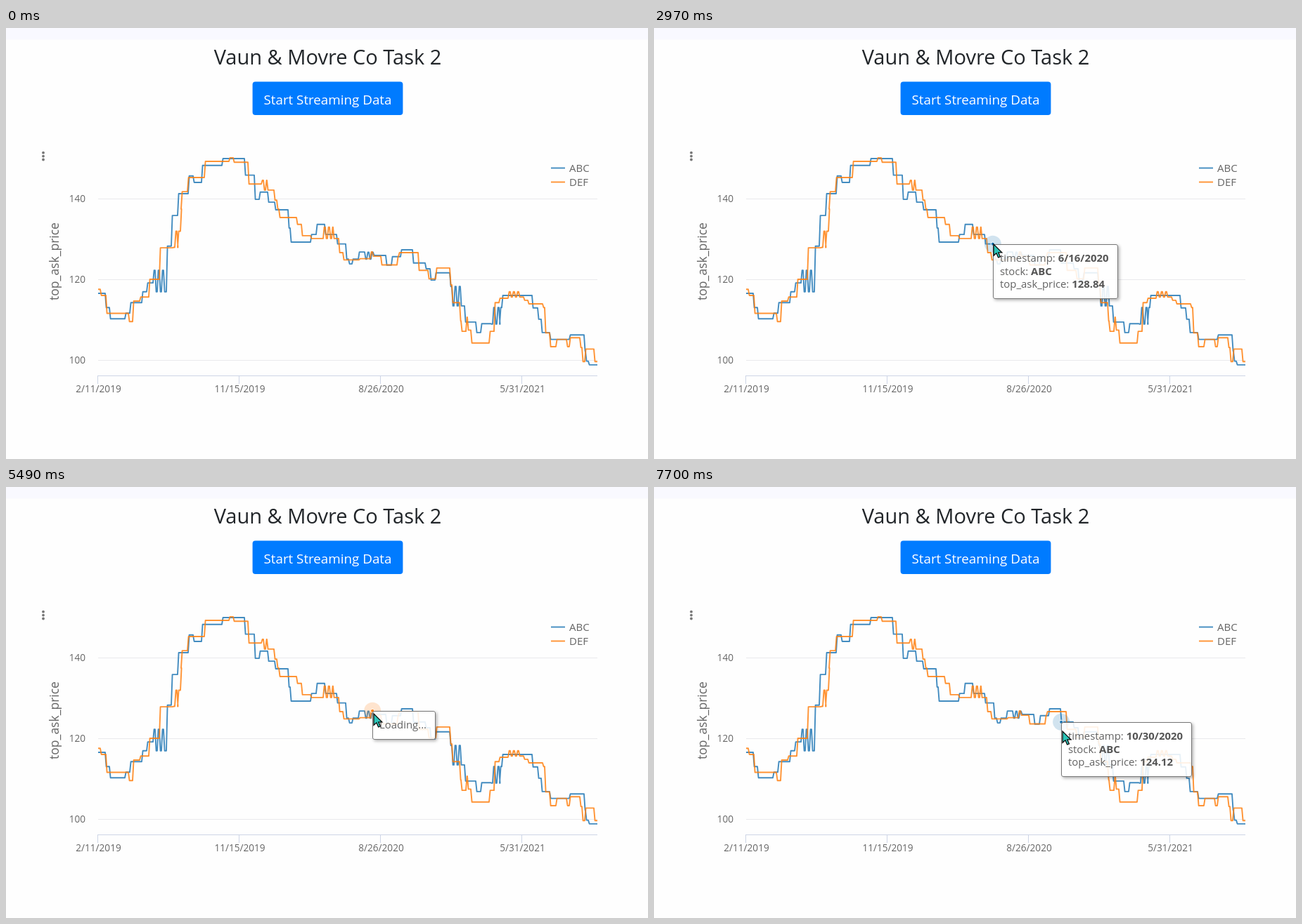
Recreate the animation shown at these times as an HTML page. Size 913 by 614 pixels, loop 8000 ms.

```html
<!DOCTYPE html>
<html lang="en">
<head>
<meta charset="utf-8">
<title>Streaming chart</title>
<style>
html, body { margin: 0; width: 100%; height: 100%; overflow: hidden; background: #fefefe; }
svg { display: block; width: 913px; height: 614px; font-family: "Open Sans", "Noto Sans", sans-serif; }
.mid { text-anchor: middle; }
.axis { font-size: 13.6px; fill: #666; }
.legend { font-size: 15px; fill: #666; }
.grid { stroke: #e9e9ec; }
.rule { stroke: #cdd5e6; fill: none; }
.line { fill: none; stroke-width: 1.9; stroke-linejoin: round; opacity: .84; }
foreignObject { overflow: visible; }
#tip {
  display: inline-block; box-sizing: border-box; padding: 9px 12px 11px 9px;
  border: 1px solid #777; border-radius: 3px; background: rgba(255,255,255,.88);
  box-shadow: 2px 2px 4px rgba(0,0,0,.3);
  font-size: 14.9px; line-height: 18.6px; white-space: nowrap; color: #626262;
}
#tip b { color: #555; }
</style>
</head>
<body>
<svg viewBox="0 0 913 614">
  <rect width="913" height="614" fill="#fefefe"/>
  <rect width="913" height="16.5" fill="#f9f9ff"/>
  <text class="mid" x="457.5" y="52" font-size="29" fill="#212529">Vaun &amp; Movre Co Task 2</text>
  <rect x="350.6" y="76.6" width="213.8" height="47.4" rx="4" fill="#007bff"/>
  <text class="mid" x="457.5" y="108.7" font-size="18.8" fill="#fff">Start Streaming Data</text>
  <g id="menu" fill="#767676"></g>
  <g id="axes"></g>
  <text class="mid" transform="translate(74.5 332.5) rotate(-90)" font-size="17.5" fill="#666">top_ask_price</text>
  <g id="plot"></g>
  <g id="hover">
    <circle id="halo" r="12" opacity=".2"/>
    <circle id="dot" r="2.6" stroke="#fff"/>
    <foreignObject id="spot" width="260" height="110"><div id="tip"></div></foreignObject>
  </g>
  <path id="cursor" d="M0 0V16.2L3.9 12.8 6.6 19 9.4 17.8 6.8 11.8H11.8Z" fill="#2cc5b8" stroke="#0a0a0a" stroke-width="1.3"/>
</svg>
<script>
const $ = id => document.getElementById(id);
const LOOP = 8000, STEP = 66;
const LEFT = 130.5, RIGHT = 841, BOTTOM = 495;
const DAY_ZERO = Date.UTC(2019, 1, 11);

const xOf = day => LEFT + day * .7155;
const yOf = price => 473.5 - (price - 100) * 5.75;
const lerp = (a, b, u) => a + (b - a) * u;
const smooth = u => u * u * (3 - 2 * u);

function add(parent, tag, attrs, text) {
  const el = document.createElementNS('http://www.w3.org/2000/svg', tag);
  for (const k in attrs) el.setAttribute(k, attrs[k]);
  if (text) el.textContent = text;
  $(parent).append(el);
}

// "x price" levels; "~" flutters between this level and the next one
const SERIES = [
  { name: 'ABC', color: '#1f77b4', levels: `131 116.6,142 113.1,148 110.3,170 111.7,177 114.3,194 117,
    201 119.2,210 122.3~,227 117,229 128.3,236 135.9,245 141.3,260 145.7,267 144.1,279 148.3,308 150,
    340 145.9,354 139.9,361 141.7,373 139.2,383 137.3,402 132.8,405 129.3,434 131.2,442 133.7,454 131.2,
    471 128.84,484 125.1,488 123.9,493 125.1,502 126.85,511 125.1~,520 126.8,523 126,541 123.6,549 125.7,
    562 127.4,579 124.12,597 122.7,604 119.9,611 121.7,632 118.3~,647 113.5,653 109.5,669 106.9,676 109.1,
    690 109~,703 113.1,706 116.1,749 113,757 110.2,762 106.9,774 105.2,802 106.3,823 102.3,825 99.8,829 98.9` },
  { name: 'DEF', color: '#ff7f0e', levels: `131 117.6,135 116.1,143 111.65,175 109.6,181 114.7,191 115.7,
    204 120.1,219 127.9,238 128~,245 132,249 137.5,250 141.8,259 145.3,283 149.3,318 150.2,324 149.1,
    345 143.7,364 144.6~,372 142.2,382 139.7,386 137.5~,392 135.4,414 133.7,421 130.9,434 130.2,
    452 133~,466 130.2,474 126.7,480 124.9,503 125.2,519 126.9,522 125.8,534 123.64,557 125.7,559 126.7,
    587 122.3,601 120.2,612 122.9,632 118.7,635 114.3,646 109.8,648 107.2,655 110.7,657 107.5,662 104.3,
    688 107.2,695 114.3,702 115.4,715 117~,730 115.7,737 114.9,743 114,764 113.1~,770 106.8,774 103.4,
    783 105.2,798 103.4,802 105.6,817 103.2,820 99.7,824 102.8,837 99.7` }
];

function expand(levels) {
  const keys = levels.split(',').map(s => [...s.trim().split(' ').map(parseFloat), s.includes('~')]);
  return keys.flatMap(([x, price, flutters], i) => {
    const points = [[x, price]];
    if (flutters) {
      const [end, other] = keys[i + 1];
      for (let n = 1; x + 3 * n < end; n++) points.push([x + 3 * n, n % 2 ? other : price]);
    }
    return points;
  });
}

function stepPath(points) {
  return points.reduce((d, [x, price], i) => {
    const y = yOf(price);
    return i ? `${d}L${x - 1} ${yOf(points[i - 1][1])}L${x + .6} ${y}` : `M${x} ${y}`;
  }, '') + `H${RIGHT}`;
}

for (let i = 0; i < 3; i++) {
  const price = 140 - 20 * i, y = yOf(price);
  add('menu', 'circle', { cx: 53, cy: 177.7 + 4.9 * i, r: 1.9 });
  add('axes', 'path', { class: 'grid', d: `M131 ${y}H${RIGHT}` });
  add('axes', 'text', { class: 'axis', x: 113, y: y + 4.7, 'text-anchor': 'end' }, String(price));
}
add('axes', 'path', { class: 'rule', d: `M130 495.5H${RIGHT}` });
['2/11/2019', '11/15/2019', '8/26/2020', '5/31/2021'].forEach((date, i) => {
  const x = LEFT + 201 * i;
  add('axes', 'path', { class: 'rule', d: `M${x} 495V507` });
  add('axes', 'text', { class: 'axis mid', x: x + 1, y: 519 }, date);
});

SERIES.forEach((s, i) => {
  const y = 199.5 + 20 * i;
  s.points = expand(s.levels);
  add('plot', 'path', { class: 'line', stroke: s.color, d: stepPath(s.points) });
  add('plot', 'path', { class: 'line', stroke: s.color, d: `M775 ${y}H795` });
  add('plot', 'text', { class: 'legend', x: 801, y: y + 5.5 }, s.name);
});

// pointer moves: start, end, day reached, pointer height, series
const [ABC, DEF] = SERIES;
const MOVES = [
  [0, 0, 1060, 620, ABC],
  [840, 1180, 520, 299, ABC],
  [1710, 1980, 487, 303, ABC],
  [2250, 2310, 483, 304, ABC],
  [2970, 2970, 491, 308, ABC],
  [3040, 3530, 523, 322, ABC],
  [3990, 4410, 545, 320, DEF],
  [5420, 5760, 550, 331, DEF],
  [6090, 6360, 594, 340, DEF],
  [6690, 6690, 586, 337, DEF],
  [6890, 7630, 624, 345, DEF],
  [7700, 7700, 627, 348, ABC]
];

function stateAt(t) {
  const i = MOVES.findLastIndex(m => m[0] <= t);
  const [start, end, day, y, series] = MOVES[i];
  if (t >= end) return { day, y, series, loaded: true };
  const gaps = Math.round((end - start) / STEP);
  const step = Math.floor((t - start) / (end - start) * gaps);
  const u = smooth((step + 1) / (gaps + 1));
  const [, , fromDay, fromY] = MOVES[i - 1];
  return { day: Math.round(lerp(fromDay, day, u)), y: lerp(fromY, y, u), series, loaded: false };
}

function dateOf(day) {
  const d = new Date(DAY_ZERO + day * 864e5);
  return `${d.getUTCMonth() + 1}/${d.getUTCDate()}/${d.getUTCFullYear()}`;
}

const show = (id, on) => $(id).setAttribute('display', on ? 'inline' : 'none');
const move = (id, x, y) => $(id).setAttribute('transform', `translate(${x} ${y})`);
const row = (label, value) => `${label}: <b>${value}</b>`;

function draw(t) {
  const { day, y: top, series, loaded } = stateAt(t);
  const x = xOf(day), visible = t >= MOVES[1][0];
  show('cursor', visible);
  move('cursor', Math.round(x + 1.5), Math.round(top));

  const inside = visible && x < RIGHT && top < BOTTOM;
  show('hover', inside);
  if (!inside) return;
  const price = series.points.findLast(p => p[0] <= x)[1], y = yOf(price);
  for (const id of ['halo', 'dot']) {
    move(id, x, y);
    $(id).setAttribute('fill', series.color);
  }
  move('spot', Math.round(x + .3), Math.round(y + .5));
  $('tip').innerHTML = loaded
    ? [row('timestamp', dateOf(day)), row('stock', series.name), row('top_ask_price', price)].join('<br>')
    : 'Loading...';
}

const begin = performance.now();
function tick() {
  draw((performance.now() - begin) % LOOP);
  requestAnimationFrame(tick);
}
tick();
</script>
</body>
</html>
```
